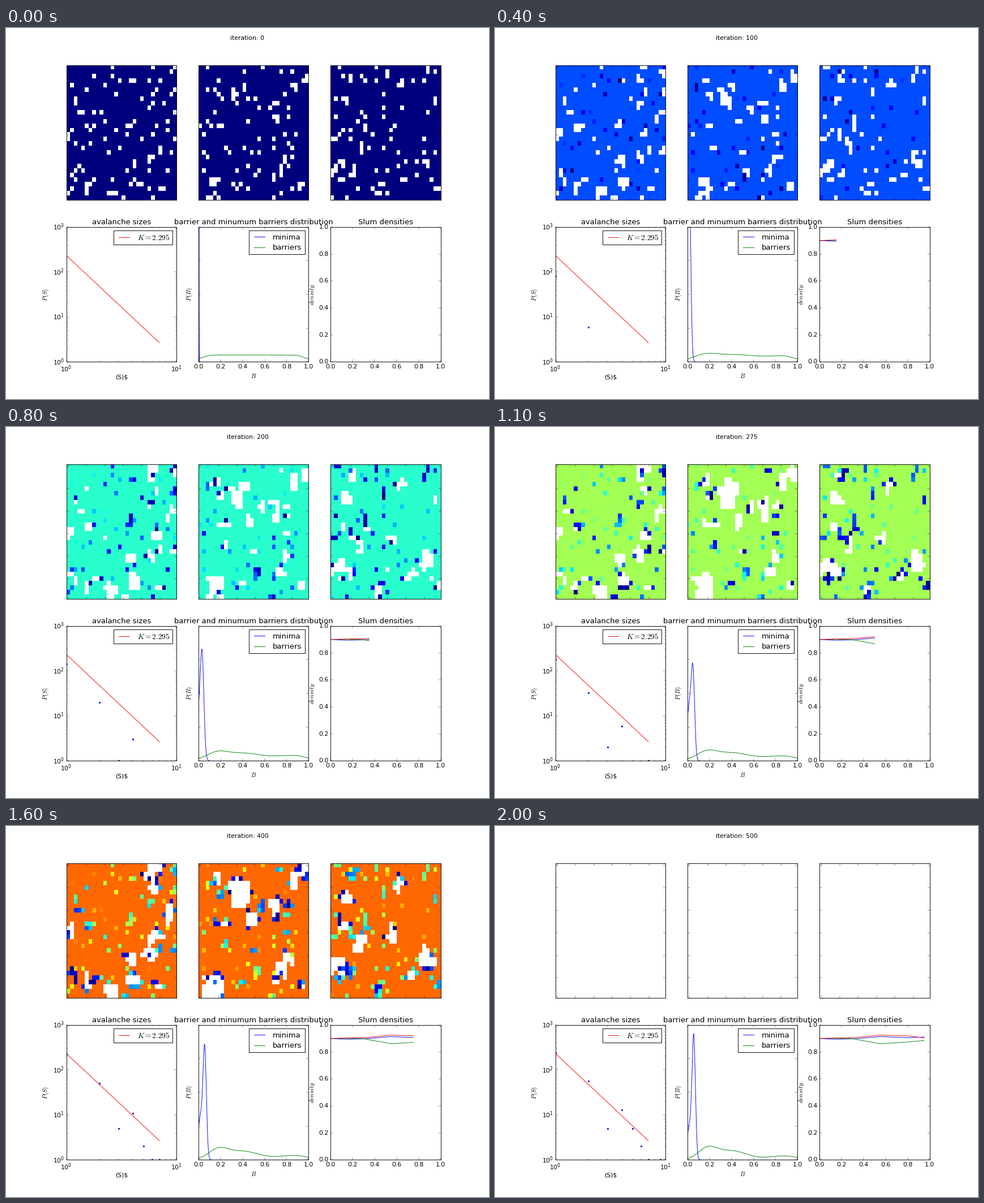
Recreate the animation shown at these times as a matplotlib script. Size 853 px wide and 656 px high, loop 2100 ms.

```python
import numpy as np
import matplotlib.pyplot as plt
from matplotlib.animation import FuncAnimation
from matplotlib.ticker import NullFormatter

plt.style.use("classic")
plt.rcParams.update({
    "font.family": "DejaVu Sans",
    "savefig.dpi": "figure",
    "figure.facecolor": "white",
    "image.interpolation": "nearest",
    "legend.labelspacing": .42,
})

W, H, DPI = 853, 656, 65.6
SIZE, STEP, FRAMES = 30, 25, 21
END = STEP * (FRAMES - 1)


def ease(t, start=0, end=1):
    """Smooth rise from 0 to 1 between start and end."""
    u = np.clip((t - start) / (end - start), 0, 1)
    return u * u * (3 - 2 * u)


def bell(x, height, mean, width):
    return height * np.exp(-((x - mean) / width) ** 2 / 2)


# Densities follow a few key points; the total population is constant.
KNOTS = [0, .15, .3, .55, .8, .95]
T = np.arange(FRAMES) / (FRAMES - 1)
left = np.interp(T, KNOTS, [.9, .894, .897, .914, .906, .911])
right = np.interp(T, KNOTS, [.9, .904, .905, .925, .92, .904])
DENSITY = [left, 2.7 - left - right, right]


def pick(rng, weight):
    """Random cell, drawn in proportion to its weight."""
    flat = weight.ravel()
    i = rng.choice(flat.size, p=flat / flat.sum())
    return np.unravel_index(i, weight.shape)


def neighbours(mask):
    p = np.pad(mask.astype(int), 1)
    return p[:-2, 1:-1] + p[2:, 1:-1] + p[1:-1, :-2] + p[1:-1, 2:]


def simulate(density, seed):
    """Age of every cell for each drawn step; vacant cells are masked."""
    rng = np.random.default_rng(seed)
    vacant = np.zeros((SIZE, SIZE), bool)
    vacant.flat[rng.choice(SIZE ** 2, 90, replace=False)] = True
    born = np.zeros((SIZE, SIZE))

    def leave():
        # Cells next to vacancies empty first, so clearings grow.
        vacant[pick(rng, ~vacant * neighbours(vacant) ** 2)] = True

    def settle(step):
        # Isolated vacancies fill first.
        cell = pick(rng, vacant / (1 + neighbours(vacant)) ** 3)
        vacant[cell] = False
        born[cell] = step

    ages = []
    for step in range(END + 1):
        if step and rng.random() < .3:
            leave()
        target = round(SIZE ** 2 * (1 - np.interp(step / END, T, density)))
        while vacant.sum() < target:
            leave()
        while vacant.sum() > target:
            settle(step)
        if step % STEP == 0:
            ages.append(np.ma.array(step - born, mask=vacant | (step == END)))
    return ages


# Avalanche size: final count and onset.
AVALANCHES = {2: (56, 0), 3: (5, .25), 4: (13, .2), 5: (5, .65),
              6: (2, .75), 7: (1, .5), 9: (1, .95)}


def avalanches(t):
    counts = {1: int(238 * (1 - (1 - t) ** 1.85))}
    for size, (total, onset) in AVALANCHES.items():
        counts[size] = int(np.ceil(total * ease(t, onset)))
    return {s: n for s, n in counts.items() if n}


def minima(x, t):
    mean = .057 * ease(t, 0, .7)
    height = 10 + 7 * ease(t, .45) + 900 * np.exp(-18 * t)
    shoulder = (12 - 7 * t) * ease(t, .2, .45)
    return (bell(x, height, mean, .002 + .013 * min(1, 5 * t))
            + bell(x, shoulder, .35 * mean, .025))


def barriers(x, t):
    flat = 1.02 - bell(x, .48, 0, .05) - bell(x, .52, 1, .05)
    skewed = (bell(x, 1.6, .18, .085) + bell(x, 1.35, .4, .14)
              + bell(x, .58, .87, .14))
    w = t ** .85
    return (1 - w) * flat + w * skewed


# The tiny margin guards against rounding down to one pixel less.
fig, axes = plt.subplots(2, 3, dpi=DPI,
                         figsize=((W + 1e-6) / DPI, (H + 1e-6) / DPI))
title = fig.suptitle("iteration: 0")

cmap = plt.get_cmap("jet").copy()
cmap.set_bad("white")
slums = [simulate(d, seed) for seed, d in enumerate(DENSITY, 11)]
images = []
for ax, ages in zip(axes[0], slums):
    images.append(ax.imshow(ages[0], cmap=cmap, vmin=0, vmax=END,
                            aspect="auto"))
    ax.set(xticks=range(0, SIZE, 5), yticks=range(0, SIZE, 5))
    ax.tick_params(labelbottom=False, labelleft=False)

size_ax, barrier_ax, density_ax = axes[1]

sizes = np.array([1, 7])
size_ax.loglog(sizes, 232 * sizes ** -2.295, "r-", label="$K=2.295$")
dots, = size_ax.plot([], [], "b.", mec="b")
size_ax.set(xlim=(1, 10), ylim=(1, 1000), title="avalanche sizes")
size_ax.set_xlabel("(S)$", labelpad=2)
size_ax.set_ylabel("$P(S)$")
size_ax.xaxis.set_minor_formatter(NullFormatter())
size_ax.yaxis.set_minor_formatter(NullFormatter())
size_ax.legend()

x = np.linspace(0, 1, 1001)
min_line, = barrier_ax.plot(x, minima(x, 0), "b-", label="minima")
bar_line, = barrier_ax.plot(x, barriers(x, 0), "g-", label="barriers")
barrier_ax.set(xlim=(0, 1), ylim=(0, 20), yticks=range(0, 21, 5),
               title="barrier and minumum barriers distribution",
               xlabel="$B$")
barrier_ax.set_ylabel("$P(B)$", labelpad=9)
barrier_ax.tick_params(labelleft=False)
barrier_ax.legend()

density_lines = [density_ax.plot([], [], c)[0] for c in "bgr"]
density_ax.set(xlim=(0, 1), ylim=(0, 1), title="Slum densities")
density_ax.set_ylabel("$density$")


def update(i):
    t = T[i]
    title.set_text(f"iteration: {i * STEP}")
    for image, ages in zip(images, slums):
        image.set_data(ages[i])
    counts = avalanches(t)
    dots.set_data(list(counts), list(counts.values()))
    min_line.set_ydata(minima(x, t))
    bar_line.set_ydata(barriers(x, t))
    for line, d in zip(density_lines, DENSITY):
        line.set_data(T[:i], d[:i])
    return [title, *images, dots, min_line, bar_line, *density_lines]


anim = FuncAnimation(fig, update, frames=FRAMES, interval=100, repeat=True)
plt.show()
```
